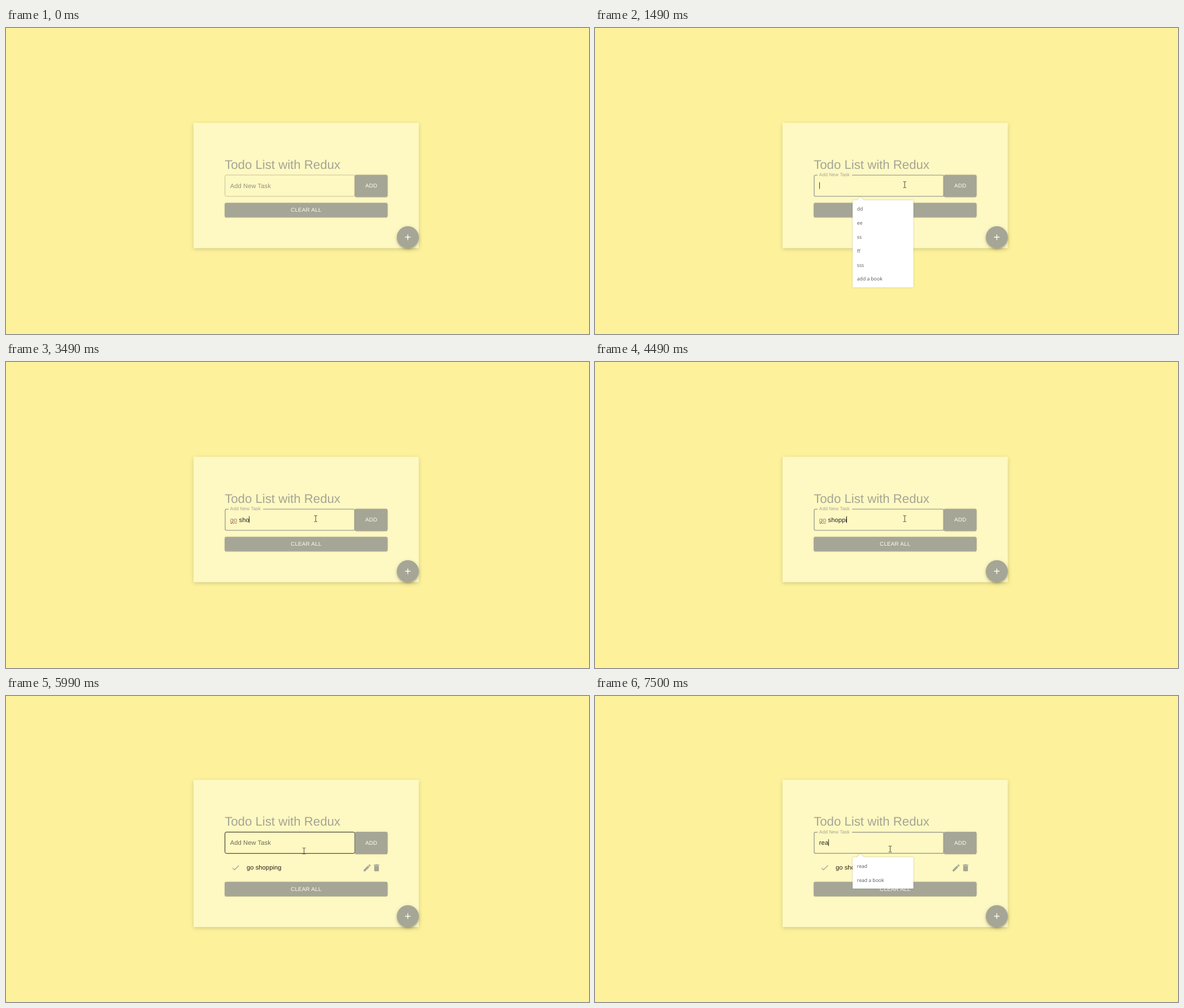
An HTML page that plays this animation: 1032 px wide and 543 px high, repeating every 8 s.

```html
<!DOCTYPE html>
<html lang="en">
<head>
<meta charset="utf-8">
<title>Todo list</title>
<style>
html, body { margin: 0; width: 100%; height: 100%; overflow: hidden; background: #fdf29b; }
svg { display: block; width: 1032px; height: 543px; }
text { font: 11.11px "Liberation Sans", Arial, sans-serif; letter-spacing: .104px; white-space: pre; text-rendering: geometricPrecision; }
.title { font-size: 22.2px; letter-spacing: 0; fill: #a4a596; }
.caption { font-size: 9.72px; letter-spacing: .28px; fill: #fffdf0; text-anchor: middle; }
.small { font-size: 8.33px; letter-spacing: .08px; fill: #a4a596; }
.option { font: 8.65px "Open Sans", "Noto Sans", sans-serif; letter-spacing: 0; fill: #555; }
.gray { fill: #a5a696; }
.card { fill: #fef8c2; filter: drop-shadow(0 2px 3.5px rgba(0,0,0,.17)); }
.button { filter: drop-shadow(0 1px .7px rgba(0,0,0,.24)) drop-shadow(0 .5px 1.5px rgba(0,0,0,.1)); }
.fab { filter: drop-shadow(0 2.2px 1.8px rgba(0,0,0,.2)) drop-shadow(0 2.5px 3.5px rgba(0,0,0,.15)); }
.menu { fill: #fff; filter: drop-shadow(0 .7px 1.2px rgba(0,0,0,.25)); }
.outline { fill: none; }
</style>
</head>
<body>
<svg viewBox="0 0 1032 543">
  <rect width="1032" height="543" fill="#fdf29b"/>
  <rect id="card" class="card" x="332" width="398.7"/>
  <g id="head">
    <text class="title" x="387.2" y="249.8">Todo List with Redux</text>
    <rect id="idleBox" class="outline" x="387.6" y="260.9" width="229.8" height="37.8" rx="2.6"/>
    <g id="focusBox">
      <path class="outline" stroke="#a0a192" stroke-width="1.4" d="M455 261.1H615a2.2 2.2 0 0 1 2.2 2.2V296.4a2.2 2.2 0 0 1-2.2 2.2H390.2a2.2 2.2 0 0 1-2.2-2.2V263.3a2.2 2.2 0 0 1 2.2-2.2H394"/>
      <text class="small" x="396.8" y="263.3">Add New Task</text>
    </g>
    <text id="hint" x="396.8" y="283.6">Add New Task</text>
    <text id="entry" x="396.8" y="283.6"><tspan id="first"></tspan><tspan id="rest" fill="#26251f"></tspan></text>
    <path id="squiggle" class="outline" stroke="#d9484b" stroke-width=".9" d="M397 285l2 2 2-2 2 2 2-2 2 2 2-2"/>
    <rect id="caret" y="273.6" width="1" height="12" fill="#3a3931"/>
    <rect id="add" class="button" x="617.4" y="260.5" width="58" height="38.9" rx="2.8"/>
    <text class="caption" x="646.6" y="283.4">ADD</text>
  </g>
  <g id="item">
    <g id="icons" class="gray"></g>
    <text x="425.9" y="308.4" fill="#2c1d18">go shopping</text>
  </g>
  <g id="foot">
    <rect class="button gray" x="387.2" y="310.3" width="288.2" height="25.3" rx="2.8"/>
    <text class="caption" x="531.3" y="326.4">CLEAR ALL</text>
    <circle class="fab gray" cx="711.3" cy="371.3" r="19.45"/>
    <path fill="#fffef4" transform="translate(702.97 362.97) scale(.6944)" d="M19 13h-6v6h-2v-6H5v-2h6V5h2v6h6v2z"/>
  </g>
  <g id="menu">
    <g class="menu">
      <rect id="menuBox" x="456" y="305.5" width="107.7" rx="1.5"/>
      <path d="M463.7 305.8l6.3-6.2 6.3 6.2z"/>
    </g>
    <g id="options"></g>
  </g>
  <g id="pointer"></g>
</svg>
<script>
const $ = id => document.getElementById(id);
const show = (id, on) => $(id).setAttribute("display", on ? "inline" : "none");
const set = (id, attrs) => Object.entries(attrs).forEach(([k, v]) => $(id).setAttribute(k, v));

const LOOP = 8000;
const ROW = 38.8;      // height one task adds to the centred card
const OPTION = 24.85;

const icons = [
  [398.2, 296.3, "M9 16.2L4.8 12l-1.4 1.4L9 19 21 7l-1.4-1.4z"],
  [631, 296.6, "M3 17.25V21h3.75L17.81 9.94l-3.75-3.75L3 17.25zM20.71 7.04c.39-.39.39-1.02 0-1.41l-2.34-2.34c-.39-.39-1.02-.39-1.41 0l-1.83 1.83 3.75 3.75 1.83-1.83z"],
  [647.6, 296.5, "M6 19c0 1.1.9 2 2 2h8c1.1 0 2-.9 2-2V7H6v12zM19 4h-3.5l-1-1h-5l-1 1H5v2h14V4z"]
];
$("icons").innerHTML = icons.map(([x, y, d]) =>
  `<path transform="translate(${x} ${y}) scale(.6944)" d="${d}"/>`).join("");

const pointers = {
  arrow: `<path fill="#fff" stroke="#333" stroke-width=".8" stroke-linejoin="round" d="M.5 .6V11.2L3 8.9l1.7 3.7 1.6-.7-1.6-3.6h3.5z"/>`,
  beam: `<path fill="none" stroke="#4c4b43" d="M-2.7-5.3h2L0-4.8l.7-.5h2M0-5V5M-2.7 5.3h2L0 4.8l.7.5h2"/>`,
  hand: `<path fill="#fff" stroke="#222" stroke-width=".9" stroke-linejoin="round" d="M4 10V2a1.2 1.2 0 0 1 2.4 0v4.5c.4-.6 1.9-.5 2 .5c.5-.6 1.8-.4 1.9.5c.6-.5 1.6-.1 1.6.8v3.2c0 1.5-1 2.2-1 4H5.2c0-1.6-2.2-3.5-3.8-6c-.6-1.2.6-2 1.5-1.2z"/>`
};

const history = ["dd", "ee", "ss", "ff", "sss", "add a book"];
const matches = ["read", "read a book"];
const beam = ["beam", 548.2, 278];
const beam2 = ["beam", 522.5, 271.6];
const typing = text => ({ focus: true, caret: true, text, pointer: beam });

const steps = [
  [0, {}],
  [500, { pointer: ["arrow", 577, 363] }],
  [990, { hover: true, pointer: beam }],
  [1490, { ...typing(""), menu: history }],
  [1990, { ...typing(""), caret: false, menu: history }],
  [2490, typing("go")],
  [3000, typing("go s")],
  [3490, typing("go sho")],
  [3990, typing("go shopp")],
  [4490, typing("go shoppi")],
  [4990, typing("go shopping")],
  [5490, { focus: true, text: "go shopping", press: true, pointer: ["hand", 650, 283.3] }],
  [5990, { task: true, hover: true, pointer: ["beam", 527.6, 275] }],
  [6500, { ...typing(""), task: true, menu: history, pointer: beam2 }],
  [7000, { ...typing(""), task: true, caret: false, menu: history, pointer: beam2 }],
  [7500, { ...typing("rea"), task: true, menu: matches, pointer: beam2 }]
];

function draw({ task, hover, focus, caret, text = "", press, menu, pointer }) {
  const shift = task ? ROW / 2 : 0;
  set("card", { y: 168.2 - shift, height: 222.4 + 2 * shift });
  set("head", { transform: `translate(0 ${-shift})` });
  set("foot", { transform: `translate(0 ${shift})` });
  set("menu", { transform: `translate(0 ${-shift})` });
  show("item", task);

  show("focusBox", focus);
  show("idleBox", !focus);
  show("hint", !focus);
  set("idleBox", { stroke: hover ? "#24231c" : "#c3bd95", "stroke-width": hover ? 1 : .9 });
  set("hint", { fill: task ? "#6c6953" : "#93917c" });
  set("add", { fill: press ? "#707167" : "#a5a696" });

  const misspelt = text.startsWith("go");
  const split = misspelt ? 2 : 0;
  $("first").textContent = text.slice(0, split);
  $("rest").textContent = text.slice(split);
  set("first", { fill: "#85836f" });
  show("squiggle", misspelt && text.length > 2);
  show("caret", caret);
  set("caret", { x: Math.round(396.8 + (text ? $("entry").getComputedTextLength() - .6 : 0)) });

  show("menu", menu);
  if (menu) {
    set("menuBox", { height: menu.length * OPTION + 6 });
    $("options").innerHTML = menu.map((label, i) =>
      `<text class="option" x="463.8" y="${324.1 + i * OPTION}">${label}</text>`).join("");
  }

  show("pointer", pointer);
  if (pointer) {
    const [shape, x, y] = pointer;
    $("pointer").innerHTML = pointers[shape];
    set("pointer", { transform: `translate(${x} ${y})` });
  }
}

const start = performance.now();
let current;
function tick(now) {
  const t = Math.max(0, now - start) % LOOP;
  const step = steps.findLast(([at]) => at <= t);
  if (step !== current) draw((current = step)[1]);
  requestAnimationFrame(tick);
}
tick(start);
</script>
</body>
</html>
```
